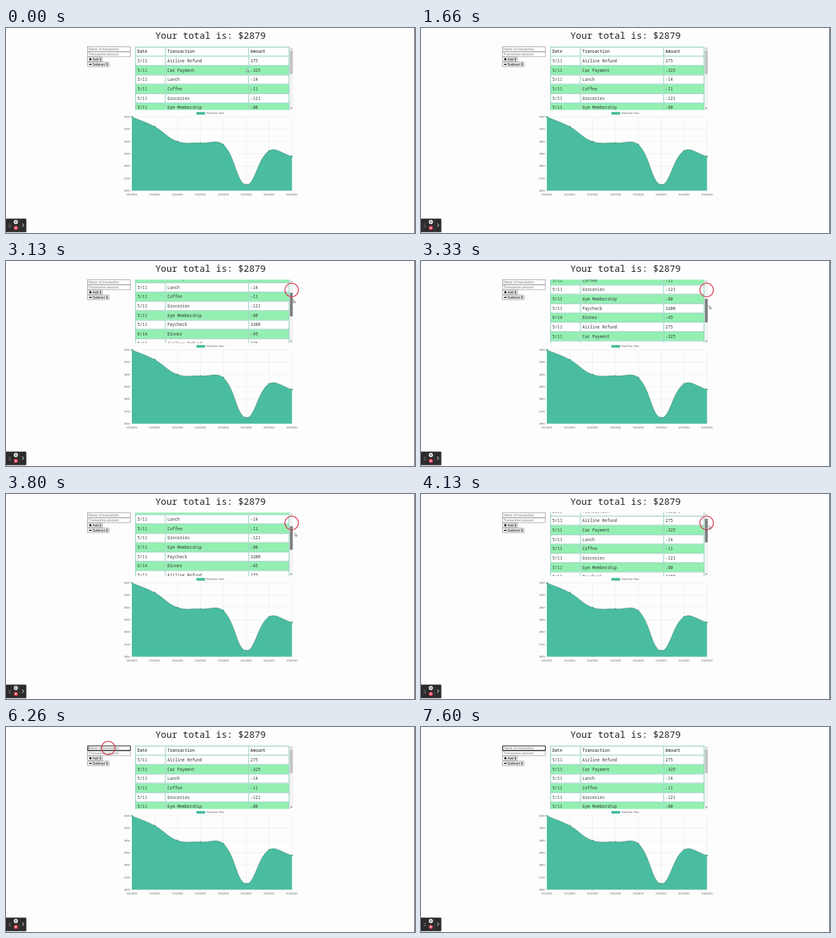
An HTML page that plays this animation: 640 px wide and 322 px high, repeating every 8 s.

```html
<!DOCTYPE html>
<html lang="en">
<head>
<meta charset="utf-8">
<title>Transaction tracker</title>
<style>
  html, body { margin: 0; width: 100%; height: 100%; overflow: hidden; background: #fdfdfd; }
  svg { display: block; width: 100vw; height: 100vh; }
  .mono { font-family: "Noto Sans Mono", "DejaVu Sans Mono", monospace; font-weight: 300; }
  .sans { font-family: "Liberation Sans", Arial, sans-serif; }
  .cell { stroke: #84c9b5; stroke-width: .6; }
  .field { fill: #fff; stroke: #858585; stroke-width: .7; }
  .button { fill: #efefef; stroke: #767676; stroke-width: .6; }
</style>
</head>
<body>
<svg id="stage" viewBox="0 0 640 322">
  <defs><clipPath id="view"><rect x="201" y="29.2" width="249" height="99.6"/></clipPath></defs>
</svg>
<script>
const NS = 'http://www.w3.org/2000/svg';
const LOOP = 8000;
const stage = document.getElementById('stage');

function add(parent, tag, attrs, text) {
  const node = document.createElementNS(NS, tag);
  for (const key in attrs) node.setAttribute(key, attrs[key]);
  if (text !== undefined) node.textContent = text;
  parent.append(node);
  return node;
}
const box = (parent, x, y, width, height, attrs) =>
  add(parent, 'rect', { x, y, width, height, ...attrs });
const label = (parent, x, y, size, text, attrs) =>
  add(parent, 'text', { x, y, 'font-size': size, class: 'sans', ...attrs }, text);
const show = (node, visible) => node.setAttribute('visibility', visible ? 'visible' : 'hidden');

label(stage, 320, 17.2, 14.4, 'Your total is: $2879',
  { class: 'mono', 'text-anchor': 'middle', fill: '#222' });
box(stage, 639.2, 0, .8, 322, { fill: '#222' });

// Form
const nameField = box(stage, 127.5, 29.6, 67, 7.4, { class: 'field' });
box(stage, 127.5, 37.7, 67, 7.3, { class: 'field' });
label(stage, 129, 35.2, 5.33, 'Name of transaction', { fill: '#757575' });
label(stage, 129, 43.2, 5.33, 'Transaction amount', { fill: '#757575' });
const focusRing = box(stage, 127.6, 29.7, 67, 7.2, { fill: 'none', stroke: '#111', 'stroke-width': 1.1, rx: .7 });
const caret = box(stage, 129, 31, .5, 5, { fill: '#111' });

function button(y, width, text, icon) {
  box(stage, 127.4, y, width, 7.2, { class: 'button', rx: .8 });
  add(stage, 'path', { d: icon, stroke: '#000', 'stroke-width': 1.4, transform: `translate(132 ${y + 3.6})` });
  label(stage, 135.2, y + 5.5, 5.33, text);
}
button(45.5, 23.4, 'Add $', 'M-2 0H2M0 -2V2');
button(53.6, 33.8, 'Subtract $', 'M-2 0H2');

// Table
const TOP = 30, PITCH = 14.65;
const columns = [[203, 46], [250, 129.2], [380, 62.7]];
const transactions = [
  ['5/11', 'Airline Refund', 275], ['5/11', 'Car Payment', -325],
  ['5/11', 'Lunch', -14], ['5/11', 'Coffee', -11],
  ['5/11', 'Groceries', -121], ['5/11', 'Gym Membership', -80],
  ['5/11', 'Paycheck', 3200], ['6/14', 'Dinner', -45]
];
const view = add(stage, 'g', { 'clip-path': 'url(#view)' });
const table = add(view, 'g', {});
const rows = [['Date', 'Transaction', 'Amount'], ...transactions, ...transactions];
box(table, 202.3, TOP - .5, 241, rows.length * PITCH, { fill: '#fff', stroke: '#6fc2aa', 'stroke-width': .6 });
rows.forEach((row, i) => {
  const y = TOP + i * PITCH;
  columns.forEach(([x, width], c) => {
    box(table, x, y + .3, width, PITCH - 1.1, { class: 'cell', fill: i && i % 2 === 0 ? '#93f0b1' : '#fff' });
    label(table, x + 2.6, y + 9.4, 6.45, row[c],
      i ? { class: 'mono', fill: '#333' } : { class: 'mono', fill: '#111', style: 'font-weight:400' });
  });
});

// Scrollbar
box(stage, 443.6, 29.4, 5.8, 99.4, { fill: '#f3f3f3' });
add(stage, 'path', { d: 'M445 33.2h3l-1.5-1.8z', fill: '#888' });
add(stage, 'path', { d: 'M445 125.2h3l-1.5 1.8z', fill: '#555' });
const thumb = box(stage, 444.3, 35.4, 4.3, 37, {});

// Chart
const TEAL = '#4abda0';
const LEFT = 197, RIGHT = 447.5, CEIL = 139.5, FLOOR = 255.5;
const totals = [3200];
for (const i of [5, 4, 3, 2, 1, 0, 7]) totals.push(totals[totals.length - 1] + transactions[i][2]);
const stepX = (RIGHT - LEFT) / (totals.length - 1);
const valueY = v => CEIL + (3200 - v) / 600 * (FLOOR - CEIL);
const points = totals.map((v, i) => [LEFT + i * stepX, valueY(v)]);

const grid = { stroke: '#e4e4e4', 'stroke-width': .5 };
for (let v = 3200; v >= 2600; v -= 100) {
  add(stage, 'path', { d: `M${LEFT - 3} ${valueY(v)}H${RIGHT}`, ...grid });
  label(stage, LEFT - 3.2, valueY(v) + 1.4, 4, v, { 'text-anchor': 'end', fill: '#555' });
}
points.forEach(([x], i) => {
  add(stage, 'path', { d: `M${x} ${CEIL}V${FLOOR + 3}`, ...grid });
  label(stage, x, 262.6, 4, i < 7 ? '5/11/2021' : '6/14/2021', { 'text-anchor': 'middle', fill: '#555' });
});

// Tension spline whose handles stay inside the plot
function spline(pts, tension) {
  const clampY = y => Math.min(FLOOR, Math.max(CEIL, y));
  const handles = pts.map((p, i) => {
    const a = pts[i - 1] || p, b = pts[i + 1] || p;
    const before = Math.hypot(p[0] - a[0], p[1] - a[1]);
    const after = Math.hypot(b[0] - p[0], b[1] - p[1]);
    const k = tension / (before + after);
    const at = f => [p[0] + f * (b[0] - a[0]), clampY(p[1] + f * (b[1] - a[1]))];
    return { enter: at(-k * before), leave: at(k * after) };
  });
  return 'M' + pts[0] + pts.slice(1).map((p, i) =>
    `C${handles[i].leave} ${handles[i + 1].enter} ${p}`).join('');
}
const curve = spline(points, .4);
add(stage, 'path', { d: `${curve}V${FLOOR}H${LEFT}Z`, fill: TEAL });
add(stage, 'path', { d: curve, fill: 'none', stroke: '#000', 'stroke-opacity': .22, 'stroke-width': 1 });
for (const [cx, cy] of points)
  add(stage, 'circle', { cx, cy, r: 1.1, fill: TEAL, stroke: '#47786b', 'stroke-width': .4 });
box(stage, 298, 131.9, 13.6, 4.3, { fill: TEAL });
label(stage, 313.4, 135.4, 4, 'Total Over Time', { fill: '#444' });

// Recorder controls
box(stage, -1, 299.4, 32.8, 21.3, { fill: '#2b2b2b', stroke: '#777', 'stroke-width': .6, rx: 1.5 });
for (let i = 0; i < 6; i++)
  add(stage, 'circle', { cx: 5 + i % 2 * 2, cy: 308 + (i >> 1) * 2.2, r: .55, fill: '#aaa' });
add(stage, 'circle', { cx: 15.4, cy: 304.8, r: 3.2, fill: '#fff' });
add(stage, 'path', { d: 'M14.6 303.3v3M16.2 303.3v3', stroke: '#222', 'stroke-width': .8 });
add(stage, 'circle', { cx: 15.4, cy: 314, r: 3.2, fill: '#e9425a' });
box(stage, 14.4, 313, 2, 2, { fill: '#fff' });
add(stage, 'path', { d: 'M21.2 300V320', stroke: '#555', 'stroke-width': .5 });
add(stage, 'path', { d: 'M25.4 307l2.4 2.7-2.4 2.7', fill: 'none', stroke: '#fff', 'stroke-width': 1 });

// Pointer
const clickRing = add(stage, 'circle', { fill: 'none', stroke: '#d8475c', 'stroke-width': 1.4 });
const pointer = add(stage, 'path', {
  d: 'M0 0V5l1.2-1 .8 1.8 .9-.4-.8-1.7h1.6z', fill: '#fff', stroke: '#333', 'stroke-width': .5
});

// Keys are [time, ...values]
function track(keys, t) {
  const i = keys.findIndex(key => key[0] > t);
  if (i === 0) return keys[0].slice(1);
  if (i < 0) return keys[keys.length - 1].slice(1);
  const a = keys[i - 1], b = keys[i], f = (t - a[0]) / (b[0] - a[0]);
  return a.slice(1).map((v, k) => v + (b[k + 1] - v) * f);
}
const drag = [[2800, 0], [2930, 4], [3130, 14.5], [3330, 24], [3460, 26.5], [3600, 24],
  [3800, 15.2], [4100, 4], [4400, 0]];
const path = [[0, 376.5, 64], [60, 376.5, 64], [860, 380, 76], [1460, 380, 72], [1640, 400, 20],
  [2000, 406, 20], [2460, 446, 42], [2660, 447, 46], [2800, 447, 46], [3330, 451, 46],
  [3800, 452, 46], [4400, 450, 46], [4660, 448, 46], [5130, 321.5, 28], [5460, 200, 31], [5600, 192, 32]];
const clicks = [{ from: 2800, to: 4660, x: 447, y: 45.5 }, { from: 6000, to: 6400, x: 160, y: 33 }];

function draw(t) {
  const [offset] = track(drag, t);
  table.setAttribute('transform', `translate(0 ${-offset * 2.72})`);
  thumb.setAttribute('y', 35.4 + offset);
  const held = t >= 2800 && t < 4660;
  const hovered = t >= 2460 && t < 4760;
  thumb.setAttribute('fill', held ? '#7b7b7b' : hovered ? '#a8a8a8' : '#c1c1c1');

  const [x, y] = track(path, t);
  pointer.setAttribute('transform', `translate(${x} ${y + offset})`);
  show(pointer, t < 1640 || (t >= 2000 && t < 5530));

  const click = clicks.find(c => t >= c.from && t < c.to + 130);
  show(clickRing, click);
  if (click) {
    clickRing.setAttribute('cx', click.x);
    clickRing.setAttribute('cy', click.y);
    clickRing.setAttribute('r', 10.6 * Math.min(1, .5 + (t - click.from) / 240));
    clickRing.setAttribute('opacity', Math.min(1, 1 - (t - click.to) / 130));
  }

  const focused = t >= 6000;
  show(nameField, !focused);
  show(focusRing, focused);
  show(caret, focused && Math.floor((t - 6000) / 532) % 2 === 0);
}

const start = performance.now();
function tick() {
  draw((performance.now() - start) % LOOP);
  requestAnimationFrame(tick);
}
tick();
</script>
</body>
</html>
```
